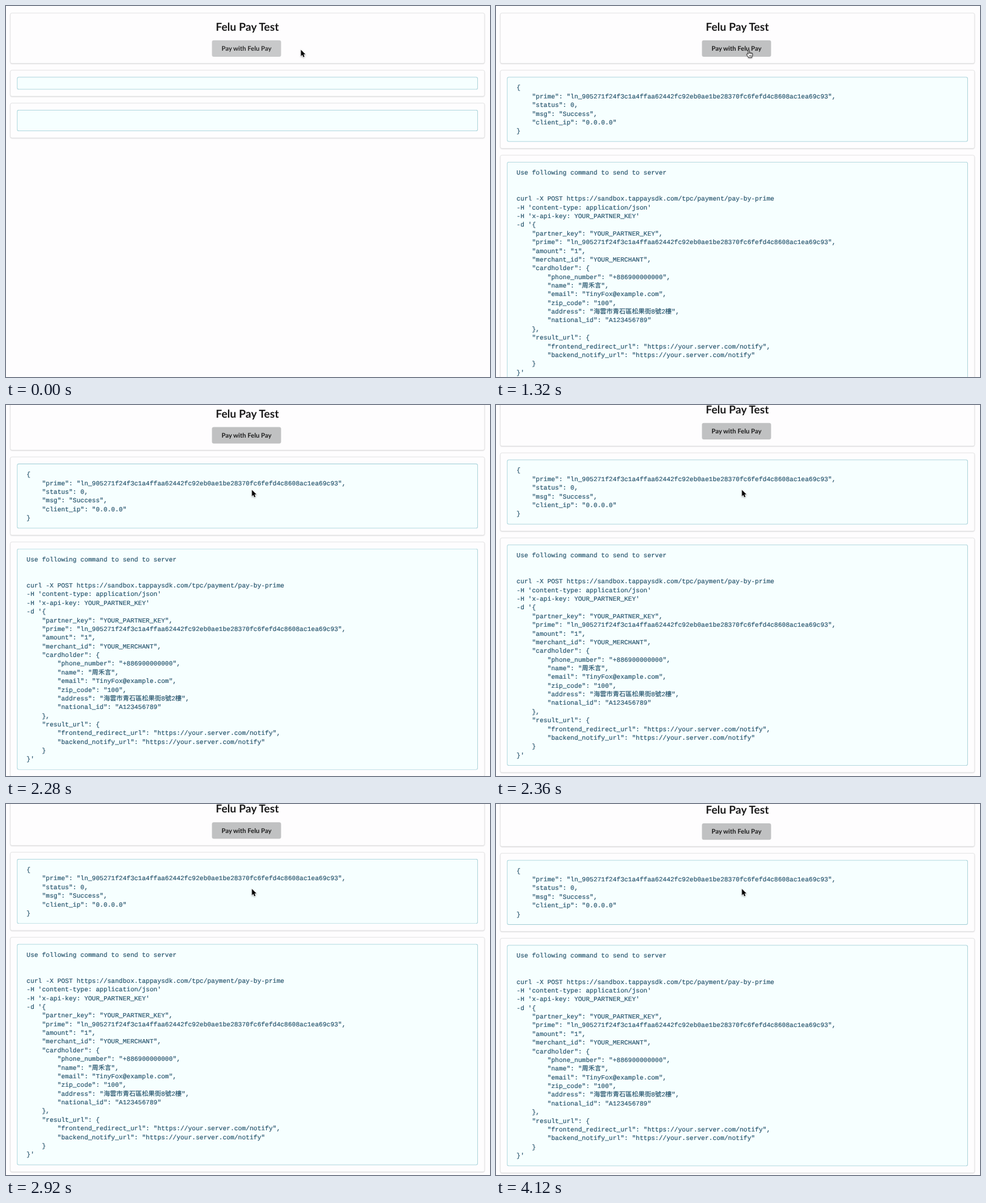
An HTML page that plays this animation: 800 by 614 pixels, repeating every 5 s.

```html
<!DOCTYPE html>
<html lang="zh-Hant">
<head>
<meta charset="utf-8">
<title>Felu Pay Test</title>
<style>
  html, body { margin: 0; width: 100%; height: 100%; overflow: hidden; background: #fefdfe; }
  #stage { position: relative; width: 800px; height: 614px; overflow: hidden; }
  #scroller { position: absolute; inset: 0; }
  #page {
    position: absolute; left: 0; top: 0; width: 1058px;
    transform: scale(.7565); transform-origin: 0 0;
    padding-top: 15.2px;
    font: 14px/20px Lato, sans-serif;
    text-rendering: geometricPrecision;
  }
  .segment {
    box-sizing: border-box; width: 1036.5px; margin: 0 0 14px 9px; padding: 14px;
    border: 1px solid rgba(34, 36, 38, .15); border-radius: 4px;
    box-shadow: 0 1px 2px rgba(34, 36, 38, .15);
  }
  .head { height: 110.9px; text-align: center; }
  h2 {
    position: relative; top: .8px; margin: 0 0 14px;
    font-size: 24px; line-height: 30.86px; font-weight: 700; color: rgba(0, 0, 0, .9);
  }
  #button {
    box-sizing: border-box; position: relative; left: -1.75px;
    width: 151px; height: 36px; margin: 0 auto; padding: 11px 0;
    border-radius: 4px; font-weight: 700; line-height: 14px; white-space: nowrap;
  }
  pre {
    margin: 0; padding: 15.5px 21px 12.5px; border-radius: 4px;
    background: #f6ffff; box-shadow: inset 0 0 0 1.2px #a2ced6;
    color: #27546d; -webkit-text-stroke: .25px #27546d;
    font: 14px/19px "Liberation Mono", "Noto Sans CJK TC", "Noto Sans CJK", monospace;
  }
  svg { position: absolute; left: 0; top: 0; overflow: visible; filter: drop-shadow(0 1px 1px rgba(0, 0, 0, .3)); }
</style>
</head>
<body>
<div id="stage">
  <div id="scroller">
    <div id="page">
      <div class="segment head">
        <h2>Felu Pay Test</h2>
        <div id="button">Pay with Felu Pay</div>
      </div>
      <div class="segment"><pre id="result"></pre></div>
      <div class="segment"><pre id="command"></pre></div>
    </div>
  </div>
  <svg id="pointer" width="16" height="16">
    <path id="arrow" d="M0 0V10.4L2.4 8.2L3.9 12L5.8 11.2L4.3 7.5H7.4Z"
      fill="#000" stroke="#fff" stroke-width="1.2" paint-order="stroke"/>
    <path id="hand" d="M-.9 7.4V1Q-.9 0 0 0T1 1V4.6Q1.8 3.8 2.8 4.9Q3.7 4.2 4.6 5.3Q6.2 5 6.2 6.8V9.2Q6 10.6 5.2 11.5V13H-.6V12Q-1.8 10.6-3.2 8.1Q-3.7 6.8-2.6 6.6Q-1.7 6.6-.9 7.8M1 4.6V6.8M2.8 4.9V7M4.6 5.3V7.2M1 9V11.2M2.6 9V11.2M4.1 9V11.2"
      fill="#fff" stroke="#111" stroke-width=".85" stroke-linejoin="round"/>
  </svg>
</div>
<script>
const $ = id => document.getElementById(id);
const LOOP = 5000, TICK = 40, RESPONSE_AT = 1320;

const prime = '"prime": "ln_905271f24f3c1a4ffaa62442fc92eb0ae1be28370fc6fefd4c8608ac1ea69c93",';
const resultText = `{
    ${prime}
    "status": 0,
    "msg": "Success",
    "client_ip": "0.0.0.0"
}`;
const commandText = `Use following command to send to server


curl -X POST https://sandbox.tappaysdk.com/tpc/payment/pay-by-prime
-H 'content-type: application/json'
-H 'x-api-key: YOUR_PARTNER_KEY'
-d '{
    "partner_key": "YOUR_PARTNER_KEY",
    ${prime}
    "amount": "1",
    "merchant_id": "YOUR_MERCHANT",
    "cardholder": {
        "phone_number": "+886900000000",
        "name": "周禾言",
        "email": "TinyFox@example.com",
        "zip_code": "100",
        "address": "海雲市青石區松果街8號2樓",
        "national_id": "A123456789"
    },
    "result_url": {
        "frontend_redirect_url": "https://your.server.com/notify",
        "backend_notify_url": "https://your.server.com/notify"
    }
}'`;

// Each track is a list of [time, ...values].
const pointerTrack = [
  [0, 487.5, 72.5], [200, 502, 73], [400, 502, 73], [840, 417.7, 72.5],
  [1800, 417.7, 72.5], [2160, 406.5, 140.5]
];
const scrollTrack = [[2200, 0], [2360, 27], [2520, 28], [2760, 28], [3320, 24.7]];
const hoverTrack = [[0, .75], [160, 0], [640, 0], [760, 1]];

const smooth = p => p * p * (3 - 2 * p);
const easeOut = p => 1 - (1 - p) ** 2;
const linear = p => p;
const mix = (a, b, p) => a + (b - a) * p;

function sample(track, time, ease) {
  const next = track.findIndex(key => key[0] > time);
  if (next === 0) return track[0].slice(1);
  if (next < 0) return track.at(-1).slice(1);
  const from = track[next - 1], to = track[next];
  const p = ease((time - from[0]) / (to[0] - from[0]));
  return from.slice(1).map((value, i) => mix(value, to[i + 1], p));
}

function setText(element, text) {
  if (element.textContent !== text) element.textContent = text;
}

function draw(time) {
  const [x, y] = sample(pointerTrack, time, smooth);
  const [scroll] = sample(scrollTrack, time, easeOut);
  const [hover] = sample(hoverTrack, time, linear);
  const answered = time >= RESPONSE_AT;
  const overButton = x > 340 && x < 454 && y > 57 && y < 84;

  setText($('result'), answered ? resultText : '');
  setText($('command'), answered ? commandText : ' ');
  $('scroller').style.transform = `translateY(${-scroll}px)`;
  $('pointer').style.transform = `translate(${x}px, ${y}px)`;
  $('arrow').style.display = overButton ? 'none' : '';
  $('hand').style.display = overButton ? '' : 'none';

  const grey = mix(224, 192, hover);
  $('button').style.background = `rgb(${grey}, ${grey + 1}, ${grey + 2})`;
  $('button').style.color = `rgba(0, 0, 0, ${mix(.6, .85, hover)})`;
}

const start = performance.now();
function frame() {
  const elapsed = (performance.now() - start) % LOOP;
  draw(Math.floor(elapsed / TICK) * TICK);
  requestAnimationFrame(frame);
}
frame();
</script>
</body>
</html>
```
